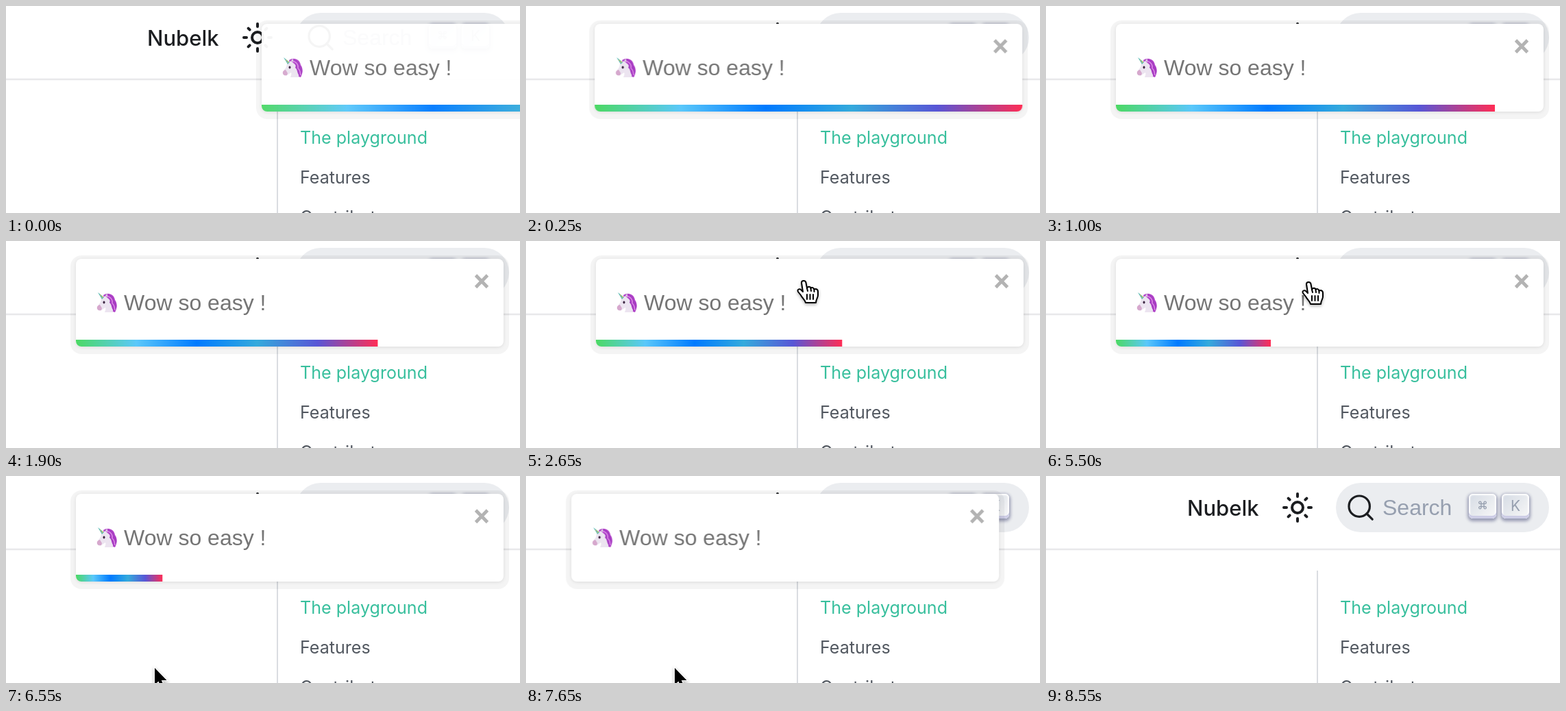
Write an HTML page that moves like this. It is 750 px wide and 302 px high and loops after 8750 ms.

```html
<!DOCTYPE html>
<html lang="en">
<head>
<meta charset="utf-8">
<title>Toast notification</title>
<style>
  html, body { margin: 0; width: 100%; height: 100%; overflow: hidden; background: #fff; }
  #stage { position: relative; width: 750px; height: 302px; overflow: hidden; }
  #stage > svg { position: absolute; left: 0; top: 0; }
  svg { display: block; overflow: visible; }
  .nav { font: 500 31px Inter, sans-serif; fill: #1c1e21; }
  .toc { font: 400 25.1px Inter, sans-serif; fill: #525860; }
  .active { fill: #38bf9d; }
  .sans { font: 32px "Liberation Sans", Arial, sans-serif; }
  .key {
    position: absolute; top: 26px; width: 40px; height: 36px; border-radius: 6px;
    background: linear-gradient(-225deg, #d5dbe4, #f8f8f8);
    box-shadow: inset 0 -4px 0 0 #cdcde6, inset 0 0 2px 2px #fff, 0 2px 4px 2px rgba(30, 35, 90, .4);
  }
  #toast {
    position: absolute; left: 102px; top: 26px; width: 624px; height: 128px;
    border-radius: 8px; background: #fff;
    box-shadow: 0 3px 0 8px rgba(0, 0, 0, .045), 0 1px 5px rgba(0, 0, 0, .1);
  }
  #clip { position: absolute; inset: 0; overflow: hidden; border-radius: 8px; }
  #bar {
    position: absolute; left: 0; bottom: 0; width: 100%; height: 10px; transform-origin: left;
    background: linear-gradient(to right, #4cd964, #5ac8fa, #007aff, #34aadc, #5856d6, #ff2d55);
  }
  #cursor { filter: drop-shadow(0 2px 2px rgba(0, 0, 0, .3)); }
</style>
</head>
<body>
<div id="stage">
  <svg width="750" height="302" fill="none">
    <path d="M0 107H750" stroke="#e8e8ea" stroke-width="2.5"/>
    <path d="M396 138V302" stroke="#dadde1" stroke-width="2"/>
    <text class="nav" x="206" y="58">Nubelk</text>
    <g id="sun" transform="translate(367 46)" stroke="#1c1e21" stroke-width="4" stroke-linecap="round">
      <circle r="8"/>
    </g>
    <rect x="423" y="10" width="311" height="72" rx="36" fill="#ebedf0"/>
    <g stroke="#1c1e21" stroke-width="3.2" stroke-linecap="round">
      <circle cx="457.200" cy="44.200" r="15.200"/>
      <path d="M468 55L476.200 63.200"/>
    </g>
    <text class="sans" x="491" y="57" fill="#969faf">Search</text>
    <text class="toc active" x="429" y="201">The playground</text>
    <text class="toc" x="429" y="259">Features</text>
    <text class="toc" x="429" y="317">Contributors</text>
  </svg>
  <div class="key" style="left:617px"></div>
  <div class="key" style="left:665px"></div>
  <svg width="750" height="302" fill="none">
    <path transform="translate(637 42.500)" stroke="#969faf" stroke-width="1.3"
      d="M-2 -2H2V2H-2ZM-2 -2H-3.500A1.700 1.700 0 1 1 -2 -3.500ZM2 -2V-3.500A1.700 1.700 0 1 1 3.500 -2ZM2 2H3.500A1.700 1.700 0 1 1 2 3.500ZM-2 2V3.500A1.700 1.700 0 1 1 -3.500 2Z"/>
    <text x="685" y="50.500" text-anchor="middle" fill="#969faf" style="font:21px Inter, sans-serif">K</text>
  </svg>

  <div id="toast">
    <div id="clip"><div id="bar"></div></div>
    <svg width="624" height="128" fill="none">
      <g transform="translate(30 49)">
        <path d="M10 4C17 -1 26 3 27 11C31 16 30 24 27 29L17 26L12 12Z" fill="#b447cb"/>
        <path d="M7 9L13 5L16 8C22 12 25 20 24 29H12C13 26 14 24 13 22L7 26C3 27 0 25 1 21L6 14Z" fill="#ece4f0"/>
        <path d="M1 21C2 19 4 18 5 18L8 23L7 26C3 27 0 25 1 21Z" fill="#d6a8cd"/>
        <path d="M12 4C19 6 21 11 19 15C23 18 21 23 26 28C31 23 30 16 26 12C25 5 18 1 12 4Z" fill="#a63cc2"/>
        <path d="M14 5C21 6 24 11 23 16C27 19 26 23 27 26" stroke="#dc86e6" stroke-width="1.500"/>
        <path d="M13 4L16 2L16 7Z" fill="#d9cde0"/>
        <path d="M2 0L11 7L8 10Z" fill="#55b9b4"/>
        <path d="M5 3L7 4L6 6ZM8 5L10 6L7.500 8.500Z" fill="#e8c25a"/>
        <ellipse cx="11" cy="14.500" rx="1.500" ry="2" fill="#3b2540"/>
      </g>
      <text class="sans" x="70" y="75" fill="#757575">Wow so easy !</text>
      <path d="M583.500 24L600.500 41.500M600.500 24L583.500 41.500" stroke="#b3b3b3" stroke-width="4.800"/>
    </svg>
  </div>

  <svg id="cursor" width="40" height="40">
    <path id="arrow" fill="#000" stroke="#fff" stroke-width="2.500" paint-order="stroke"
      d="M0 0V24.500L5.500 19.500L10 31L14.500 29L9.800 18H17.500Z"/>
    <g id="hand" stroke="#000" stroke-width="2" stroke-linejoin="round" stroke-linecap="round">
      <path fill="#fff" d="M-3 3C-3 -1 3 -1 3.500 3L5 11C6 8 10 8 10.500 11C12 9 15 10 15.500 13C17 11 21 12 21 16V21C21 25 18 27 18 32H3C2 28 -2 25 -4 21L-8 16C-10 12 -5 11 -3 14L-1 16Z"/>
      <path fill="none" d="M5 11L6 15M10.500 11L11 15M15.500 13V16M5 20V27M9.500 20V27M14 20V27"/>
    </g>
  </svg>
</div>

<script>
  const LOOP = 8750, STEP = 50;
  const $ = id => document.getElementById(id);

  $('sun').innerHTML += Array.from({ length: 8 }, (_, i) =>
    `<path d="M0 -16V-${i % 2 ? 19 : 20}" transform="rotate(${i * 45})"/>`).join('');

  // Each key is [ms, styles, easing towards the next key].
  const tracks = [];
  function track(id, keys) {
    const frames = keys.map(([ms, style, easing = 'linear']) => ({ offset: ms / LOOP, easing, ...style }));
    frames.push({ ...frames[frames.length - 1], offset: 1 });
    const anim = $(id).animate(frames, { duration: LOOP, iterations: Infinity });
    anim.pause();
    tracks.push(anim);
  }

  const slide = (x, opacity = 1) => ({ transform: `translateX(${x}px)`, opacity });
  const scale = s => ({ transform: `scaleX(${s})` });
  const at = (x, y) => ({ transform: `translate(${x}px, ${y}px)` });
  const OUT = 'cubic-bezier(.215, .61, .355, 1)';
  const MOVE = 'cubic-bezier(.33, 0, .67, 1)';

  track('toast', [
    [0, slide(271, .96), 'step-end'],
    [50, slide(2), OUT],
    [115, slide(20), OUT],
    [220, slide(-10), OUT],
    [290, slide(0)],
    [7564, slide(0), 'ease'],
    [7704, slide(-40), 'ease'],
    [8264, slide(4000, 0)]
  ]);

  // The countdown of 5 s pauses while the pointer is over the toast.
  const hovers = [[2550, 3413], [4483, 5753]];
  const paused = hovers.map(([a, b]) => b - a);
  const START = 431;
  const left = run => scale(1 - run / 5000);
  const run1 = hovers[0][0] - START, run2 = hovers[1][0] - START - paused[0];
  track('bar', [
    [0, scale(1)],
    [START, scale(1)],
    [hovers[0][0], left(run1)],
    [hovers[0][1], left(run1)],
    [hovers[1][0], left(run2)],
    [hovers[1][1], left(run2)],
    [START + 5000 + paused[0] + paused[1], scale(0)]
  ]);

  track('cursor', [
    [0, at(330, 320)],
    [2400, at(330, 320), MOVE],
    [2650, at(405, 58)],
    [3150, at(405, 58), MOVE],
    [3675, at(228, 245)],
    [4350, at(228, 245), MOVE],
    [4600, at(383, 60)],
    [5500, at(383, 60), MOVE],
    [6060, at(217, 280)]
  ]);

  const toggle = (id, times, on) => track(id, [0, ...times].map((ms, i) =>
    [ms, { opacity: (i % 2 === 0) === on ? 1 : 0 }, 'step-end']));
  toggle('hand', hovers.flat(), false);
  toggle('arrow', [...hovers.flat(), 8550], true);

  const origin = performance.now();
  function draw() {
    const t = Math.floor((performance.now() - origin) % LOOP / STEP) * STEP;
    tracks.forEach(anim => { anim.currentTime = t; });
    requestAnimationFrame(draw);
  }
  draw();
</script>
</body>
</html>
```
